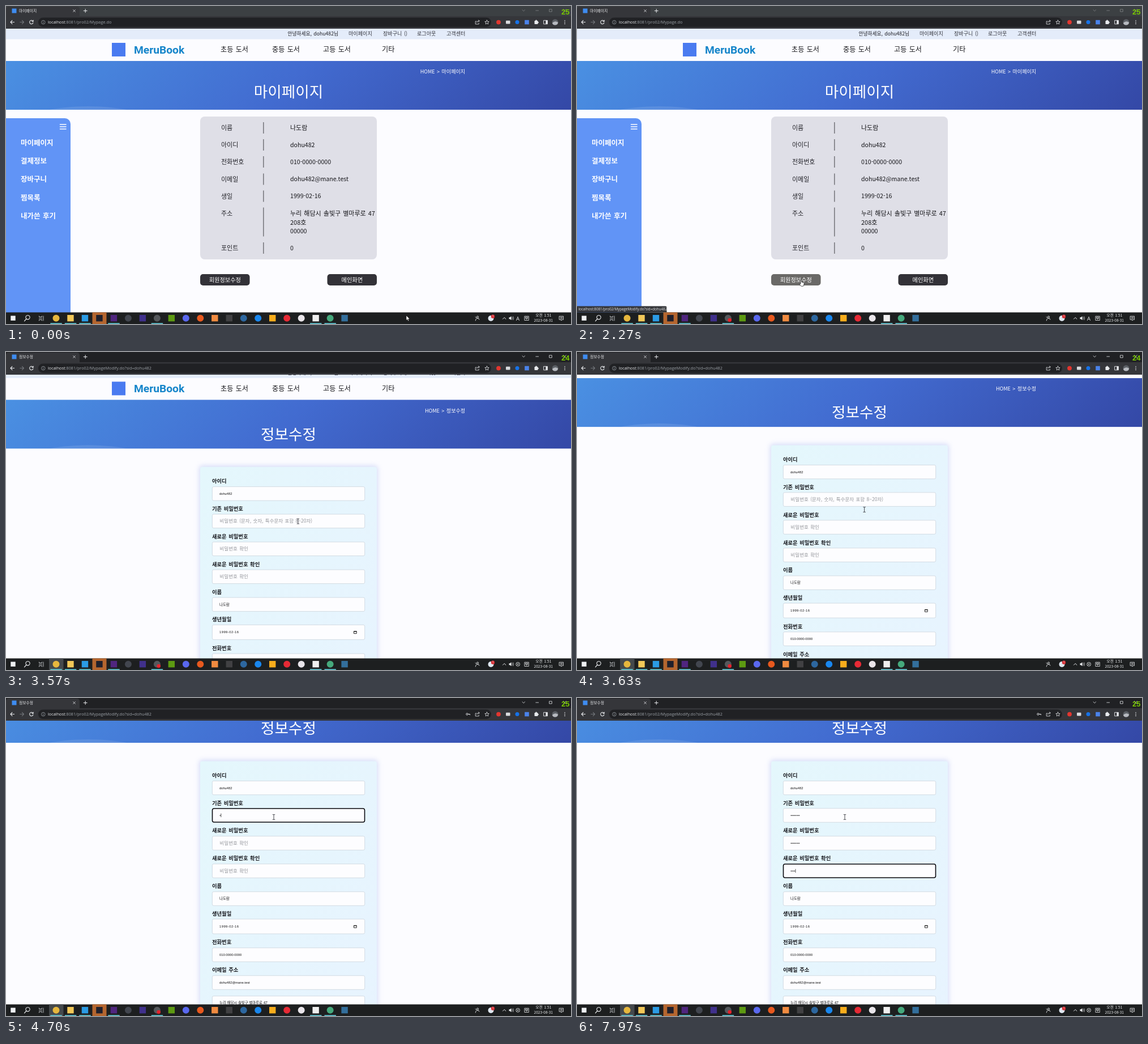
An HTML page that plays this animation: 998x561 px, repeating every 8000 ms.

```html
<!DOCTYPE html>
<html lang="ko">
<head>
<meta charset="utf-8">
<title>마이페이지</title>
<style>
  html, body { margin: 0; width: 100%; height: 100%; overflow: hidden; background: #fcfcff; }
  svg { display: block; width: 998px; height: 561px; }
  text { font-family: "Noto Sans CJK KR", "Noto Sans CJK JP", "Noto Sans CJK", sans-serif; word-spacing: 1px; white-space: pre; }
  .ui { font-family: "Open Sans", "Noto Sans CJK KR", sans-serif; word-spacing: 0; }
  .field { font-family: "Liberation Sans", "Noto Sans CJK KR", sans-serif; word-spacing: 0; }
  .brand { font-family: Roboto, sans-serif; }
  .bold { font-weight: 700; }
  .medium { font-weight: 500; }
  .thin { font-weight: 300; }
  .line { fill: none; stroke-linecap: round; stroke-linejoin: round; }
</style>
</head>
<body>
<svg id="stage" viewBox="0 0 998 561"></svg>
<script>
const LOOP = 8000;
const user = 'dohu482', person = '나도람', phone = '010-0000-0000', mail = user + '@mane.test';
const address = '누리 해담시 솔빛구 별마루로 47';
const modifyPath = ':8081/pro02/MypageModify.do?sid=' + user;

// Markup helpers; text is placed by its vertical centre.
const text = (x, cy, size, str, fill = '#222', cls = '', extra = '') =>
  `<text x="${x}" y="${cy + size * 0.37}" font-size="${size}" fill="${fill}" class="${cls}" ${extra}>${str}</text>`;
const rect = (x, y, w, h, fill, r = 0, extra = '') =>
  `<rect x="${x}" y="${y}" width="${w}" height="${h}" rx="${r}" fill="${fill}" ${extra}/>`;
const circle = (x, y, r, fill, extra = '') => `<circle cx="${x}" cy="${y}" r="${r}" fill="${fill}" ${extra}/>`;
const line = (d, stroke = '#e4e6ea', w = 1) => `<path class="line" d="${d}" stroke="${stroke}" stroke-width="${w}"/>`;
const group = (id, body, extra = '') => `<g id="${id}" ${extra}>${body}</g>`;
const MIDDLE = 'text-anchor="middle"', END = 'text-anchor="end"';

const defs = `<defs>
  <linearGradient id="hero" gradientUnits="userSpaceOnUse" x1="228" y1="-131" x2="770" y2="411">
    <stop offset="0" stop-color="#4a90e2"/><stop offset=".5" stop-color="#426bd0"/>
    <stop offset="1" stop-color="#3448a6"/>
  </linearGradient>
  <linearGradient id="form" x1="0" y1="0" x2="1" y2="1">
    <stop offset="0" stop-color="#e4f7fc"/><stop offset="1" stop-color="#e8f3ff"/>
  </linearGradient>
  <filter id="glow" x="-10%" y="-10%" width="120%" height="120%"><feGaussianBlur stdDeviation="4"/></filter>
  <clipPath id="heroClip"><rect y="97" width="998" height="86"/></clipPath>
</defs>`;

function siteHeader() {
  const top = [[605, '마이페이지'], [666, '장바구니 ()'], [726, '로그아웃'], [778, '고객센터']];
  const nav = [[379, '초등 도서'], [470, '중등 도서'], [560, '고등 도서'], [664, '기타']];
  return rect(0, 40, 998, 18.5, '#e4ecfa')
    + text(587, 49, 8.7, `안녕하세요, ${user}님`, '#1c1c22', '', END)
    + top.map(([x, s]) => text(x, 49, 9.1, s, '#33343c')).join('')
    + rect(187, 65, 24, 24, '#4a7bf0')
    + text(226, 76.5, 19.2, 'MeruBook', '#1585ca', 'brand bold')
    + nav.map(([x, s]) => text(x, 77, 12.1, s, '#17171c', 'medium')).join('')
    + rect(0, 97, 998, 86, 'url(#hero)')
    + '<ellipse cx="145" cy="205" rx="110" ry="28" fill="#fff" opacity=".1" clip-path="url(#heroClip)"/>';
}

const heroText = (title, cy) => text(499, cy, 26.6, title, '#fff', 'thin', MIDDLE)
  + text(811, 116, 9, `HOME &gt; ${title}`, '#fff', '', END);

function myPage() {
  const rows = [[215, '이름', person], [245, '아이디', user], [275, '전화번호', phone], [305.5, '이메일', mail],
    [335.5, '생일', '1999-02-16'], [365.5, '주소', address], [427, '포인트', '0']];
  const menu = ['마이페이지', '결제정보', '장바구니', '찜목록', '내가쓴 후기'];
  const isKorean = s => /[가-힣]/.test(s);
  return heroText('마이페이지', 151)
    + '<path d="M0 198H104a10 10 0 0 1 10 10V541H0Z" fill="#6194f6"/>'
    + line('M95.5 209h10.5M95.5 213h10.5M95.5 217h10.5', '#fff', 1.6)
    + menu.map((s, i) => text(26, 241 + i * 32.4, 12.5, s, '#fff', 'bold')).join('')
    + rect(343, 195, 312, 252, '#dfdfe7', 8)
    + rows.map(([y, label, value]) => text(380, y, 11, label, '#222228')
      + rect(454.3, y - 10, 1.1, label === '주소' ? 51 : 20, '#4c4c52')
      + text(502, y, isKorean(value) ? 11 : 10.6, value, '#16161a')).join('')
    + text(502, 381.5, 11, '208호', '#16161a') + text(502, 397.5, 10.6, '00000', '#16161a')
    + rect(343, 473, 87.5, 20, '#333238', 5, 'id="editButton"') + text(386.8, 483, 10.2, '회원정보수정', '#fff', '', MIDDLE)
    + rect(567.5, 473, 87.5, 20, '#333238', 5) + text(611.3, 483, 10.2, '메인화면', '#fff', '', MIDDLE);
}

const passwordY = [311, 360, 409];
function modifyPage() {
  const labels = [[240.5, '아이디'], [289.3, '기존 비밀번호'], [338, '새로운 비밀번호'], [387, '새로운 비밀번호 확인'],
    [435.7, '이름'], [484.5, '생년월일'], [535, '전화번호'], [584, '이메일 주소']];
  const values = [[262.5, user], [458, person], [507, '1999-02-16'], [557, phone], [606, mail], [642, address]];
  const hints = ['비밀번호 (문자, 숫자, 특수문자 포함 8~20자)', '비밀번호 확인', '비밀번호 확인'];
  const box = (cy, h = 24.5) => rect(364.3, cy - h / 2, 269.4, h, '#fdfdff', 2.5, 'stroke="#cbd3dc" stroke-width=".8"');
  const valueText = (cy, s) => {
    const korean = /[가-힣]/.test(s), date = s.startsWith('1999');
    return text(377, cy, korean ? 6.4 : 5.78, s, '#111', 'field', date ? 'letter-spacing=".5"' : '');
  };
  return heroText('정보수정', 157.5)
    + rect(341, 213, 316, 600, '#b9c4f2', 6, 'filter="url(#glow)" opacity=".55"')
    + rect(343, 215.5, 312, 600, 'url(#form)', 4)
    + labels.map(([y, s]) => text(364, y, 9.3, s, '#15161b', 'bold')).join('')
    + values.map(([y, s]) => box(y, y === 507 ? 26 : 24.5) + valueText(y, s)).join('')
    + line('M614.8 505.3h4.4v4h-4.4ZM614.8 505.8h4.4', '#111', 0.9)
    + passwordY.map((y, i) => box(y)
      + text(377.5, y - 0.5, 8.5, hints[i], '#94969b', '', `id="hint${i}"`)
      + text(377.3, y, 5.78, '', '#111', 'field', `id="dots${i}"`)).join('')
    + rect(364.5, 0, 269, 24, 'none', 3, 'id="focus" stroke="#0c0c10" stroke-width="1.6"')
    + rect(0, 0, 0.7, 6.5, '#111', 0, 'id="caret"');
}

function browserFrame() {
  const white = '#e8eaed', grey = '#9aa0a6';
  return rect(0, 0, 998, 19, '#202124', 0, 'id="tabStrip"')
    + '<path d="M0 18.5V6q0-5 5-5H125q5 0 5 5V18.5Z" fill="#35363a"/>'
    + rect(0, 18, 998, 22, '#35363a') + rect(57, 20.5, 800, 16.5, '#202124', 8.2)
    + rect(10.5, 4.5, 8, 8, '#3f8cf0', 0, 'id="favicon"')
    + text(23, 8.3, 6.8, '', white, 'ui', 'id="tabTitle"')
    + line('M118.7 6.7l3.6 3.6M122.3 6.7l-3.6 3.6', white, 0.9) + line('M137.2 8.5h6M140.2 5.5v6', white)
    + line('M14.6 28.5H8M11 25.4L8 28.5l3 3.1', white, 1.1) + line('M24.8 28.5h6.6M28.4 25.4l3 3.1-3 3.1', '#73767b', 1.1)
    + group('reload', line('M47.7 27a3.2 3.2 0 1 0 .2 2.5M48.2 25v2.3h-2.4', white, 1.1))
    + group('stop', line('M42 25.7l5.4 5.4M47.4 25.7l-5.4 5.4', white, 1.2))
    + circle(65.8, 28.7, 3.3, 'none', `stroke="${grey}" stroke-width=".8"`) + line('M65.8 28.3v2M65.8 26.9v.1', grey, 0.8)
    + text(74, 28.6, 7.3, `<tspan fill="${white}">localhost</tspan><tspan id="path"></tspan>`, grey, 'ui')
    + group('key', circle(814.4, 28.5, 1.6, 'none', `stroke="${white}"`) + line('M816.2 28.5h3.2v1.3', white))
    + line('M831 27h-1.8v5h6v-2M831.5 29q.5-3 4.5-2.7M834.5 24.8l1.8 1.6-1.8 1.5', white, 0.8)
    + line('M849.5 25l1.1 2.4 2.6.2-2 1.8.6 2.6-2.3-1.4-2.3 1.4.6-2.6-2-1.8 2.6-.2Z', white, 0.8)
    + circle(870, 28.6, 3.9, '#e2362f') + rect(883, 25.8, 7.5, 5.8, '#d9dbde', 1)
    + circle(903, 28.6, 3.5, '#1672e8') + rect(916.2, 24.8, 7.6, 7.6, '#4a83ea')
    + rect(933.5, 26, 6, 6, white, 0.8) + circle(936.5, 25.8, 1.3, white) + circle(939.6, 29, 1.3, white)
    + line('M950 25.4h6.4v6.4H950Z', white, 0.9) + rect(953.4, 25.4, 3, 6.4, white)
    + circle(970, 28.6, 5.4, '#5c6066') + '<path d="M964.8 30q5-5 10.4-1a5.4 5.4 0 0 1-10.4 1Z" fill="#b7bac0"/>'
    + [25.8, 28.6, 31.4].map(y => circle(987, y, 0.8, white)).join('')
    + group('windowButtons', line('M912 6.8l2.3 2.2 2.3-2.2M935.8 8h4.8M960 5.8h4.2v4.2H960ZM984.5 5.5l4.8 4.8M989.3 5.5l-4.8 4.8', white, 0.8))
    + text(981, 9.7, 13, '25', '#78c800', 'field bold', 'id="fps"');
}

function taskbar() {
  // One plain mark per app, evenly spaced from the left: shape, colour, running.
  const apps = ['c#e6b73d+', 's#f2c859+', 's#2b9be4+', 's#20202c', 's#50267f+', 'c#42464f', 's#40308c', 'c#55585c+', 's#5d9a12',
    'c#5a68ee', 'c#e8591e', 's#f08b40', 's#414143', 'c#2d679f', 'c#1987ee', 's#f9ad1c', 'c#e62a35', 'c#e9e5ea', 's#efefef+', 'c#45a97c+', 's#336f9c'];
  const white = '#eef0f2';
  return rect(0, 540.5, 998, 21, '#1d1f20')
    + rect(76, 540.5, 25.5, 20.5, '#45494c', 0, 'id="activeApp"') + rect(152.5, 540.5, 25, 20.5, '#b5662f')
    + rect(8.3, 546.5, 8.4, 8.4, white)
    + circle(38.5, 549.3, 3.6, 'none', `stroke="${white}" stroke-width="1.1"`) + line('M35.9 552l-3.4 3.8', white, 1.2)
    + line('M58.5 547v1.5h5V547M58.5 555v-1.5h5v1.5M58.5 551h5M66 547v8', '#c9ccd0', 0.9)
    + apps.map((app, i) => {
      const x = 88.5 + i * 25.48, color = app.slice(1, 8);
      return (app[0] === 'c' ? circle(x, 550.7, 6, color) : rect(x - 5.7, 545, 11.4, 11.4, color))
        + (app.endsWith('+') ? rect(x - 10.2, 559.3, 20.5, 1.7, '#5fc3cf') : '');
    }).join('')
    + circle(269.7, 554, 3.3, '#e7222b', 'id="recording"')
    + circle(833, 548.7, 1.6, 'none', `stroke="${white}" stroke-width=".9"`) + line('M829.3 555q.3-4 3.7-4 2.6 0 3 2M829 548.5l1.6 1.4', white, 0.9)
    + circle(856.5, 551, 5, '#dfe8f2') + circle(860, 547.7, 3.2, '#d92f35') + text(860, 547.7, 4.5, '1', '#fff', 'ui', MIDDLE)
    + line('M877.5 552.2l2.7-2.7 2.7 2.7', white)
    + `<path d="M888.5 549.3h1.7l2.3-2v7l-2.3-2h-1.7Z" fill="${white}"/>` + line('M894 549q1.2 1.8 0 3.5M895.7 547.8q2 3 0 6', white, 0.7)
    + text(904, 551, 9.5, 'A', white, 'ui', MIDDLE + ' id="langMark"')
    + group('imeMark', circle(904.2, 550.8, 3.4, 'none', `stroke="${white}" stroke-width=".8"`) + line('M902.7 549.3l3 3M905.7 549.3l-3 3', white, 0.8))
    + line('M916.3 547.3h7v7.2h-7ZM918 549h3.6v2H918ZM919.8 551v2', white, 0.8)
    + text(949.5, 546, 6.6, '오전 1:51', white, '', MIDDLE) + text(949.3, 555, 6.5, '2023-08-31', white, '', MIDDLE)
    + line('M977.5 547.3h7v6h-2.2l-1.5 1.8v-1.8h-3.3ZM979.2 549.3h3.6M979.2 551.2h3.6', white, 0.8);
}

const statusBubble = '<path d="M0 529.5H156q2.5 0 2.5 2.5V540.5H0Z" fill="#35363a"/>'
  + text(2.5, 535, 6.25, 'localhost' + modifyPath, '#dfe1e5', 'ui');

const cursors = group('arrow', '<path d="M0 0v8.6l2-1.8 1.3 3 1.5-.6-1.3-3h2.7Z" fill="#fff" stroke="#111" stroke-width=".6"/>')
  + group('hand', '<path d="M-1 0q1-.9 1.8 0v4l3.2.7q1.4.5 1.2 2l-.7 3.3q-.3 1.3-1.4 1.3H.3q-.8 0-1.3-.8l-2.3-3.4q.7-1.1 2.3.2Z" fill="#fff" stroke="#111" stroke-width=".7"/>')
  + group('beam', line('M-1.8-4.4h1.3l.5.4.5-.4h1.3M0-4V4M-1.8 4.4h1.3L0 4l.5.4h1.3', '#33343a', 0.9));

const stage = document.getElementById('stage');
stage.innerHTML = defs + rect(0, 0, 998, 561, '#fcfcff')
  + group('page', siteHeader() + group('myPage', myPage()) + group('modifyPage', modifyPage()))
  + browserFrame() + group('status', statusBubble) + taskbar() + group('cursor', cursors);

const el = id => document.getElementById(id);
const show = (id, on) => el(id).setAttribute('display', on ? 'inline' : 'none');
const set = (id, attrs) => { for (const k in attrs) el(id).setAttribute(k, attrs[k]); };
const between = (t, a, b) => t >= a && t < b;

// Interpolates rows of [time, ...values].
function track(rows, t) {
  const i = rows.findIndex(row => row[0] > t);
  if (i < 0) return rows[rows.length - 1].slice(1);
  const a = rows[i - 1], b = rows[i], p = (t - a[0]) / (b[0] - a[0]);
  return a.slice(1).map((v, k) => v + (b[k + 1] - v) * p);
}

const pointer = [[0, 707, 546], [350, 707, 546], [900, 590, 524], [1350, 420, 488], [1600, 396, 483], [2600, 396, 483],
  [3000, 468, 434], [3400, 514, 306], [3570, 516, 299], [3730, 494, 244], [4150, 473, 210]];
const scrolling = [[0, 0], [3535, 0], [3570, 12], [3650, 63], [3730, 103], [3780, 104]];
const typing = [
  { focus: 4300, start: 4600, step: 130 },
  { focus: 6050, start: 6250, step: 125 },
  { focus: 7300, start: 7450, step: 150 }
];
const CLICK = 2600, SWAP = 2830, LOADED = 3200;

function drawTyping(t) {
  const active = typing.findLastIndex(f => t >= f.focus);
  typing.forEach(({ focus, start, step }, i) => {
    const count = Math.max(0, Math.min(8, Math.floor((t - start) / step) + 1));
    el('dots' + i).textContent = '•'.repeat(count);
    show('hint' + i, count === 0);
    if (i !== active) return;
    const lastKey = count ? start + (count - 1) * step : focus;
    set('focus', { y: passwordY[i] - 12 });
    set('caret', { x: 377.5 + count * 2.02, y: passwordY[i] - 3.3 });
    show('caret', (t - lastKey) % 1000 < 500);
  });
  show('focus', active >= 0);
  if (active < 0) show('caret', false);
}

function draw(t) {
  const [x, y] = track(pointer, t), [scroll] = track(scrolling, t);
  const modified = t >= SWAP, focused = t >= CLICK, loading = between(t, CLICK, LOADED);
  const overButton = !modified && between(x, 343, 430.5) && between(y, 473, 493);

  set('page', { transform: `translate(0 ${-scroll})` });
  show('myPage', !modified);
  show('modifyPage', modified);
  set('editButton', { fill: overButton ? '#6a6967' : '#333238' });
  drawTyping(t);

  el('tabTitle').textContent = !modified ? '마이페이지' : loading ? 'localhost:8081/pro02/MypageModif' : '정보수정';
  set('tabTitle', { 'font-size': modified && loading ? 6.1 : 6.8 });
  set('favicon', { fill: modified && loading ? '#73777d' : '#3f8cf0' });
  el('path').textContent = modified ? modifyPath : ':8081/pro02/Mypage.do';
  show('reload', !loading);
  show('stop', loading);
  show('key', t >= typing[0].start);
  set('tabStrip', { fill: focused ? '#202124' : '#3c4043' });
  set('windowButtons', { opacity: focused ? 1 : 0.4 });
  el('fps').textContent = between(t, CLICK, 4150) || between(t, 6900, 7600) ? '24' : '25';

  show('status', between(t, 1400, 3150));
  show('recording', t >= 400);
  show('activeApp', focused);
  show('langMark', !focused);
  show('imeMark', focused);

  set('cursor', { transform: `translate(${x} ${y})` });
  show('arrow', !overButton && !modified);
  show('hand', overButton);
  show('beam', modified);
}

const began = performance.now();
function tick() {
  draw((performance.now() - began) % LOOP);
  requestAnimationFrame(tick);
}
tick();
</script>
</body>
</html>
```
